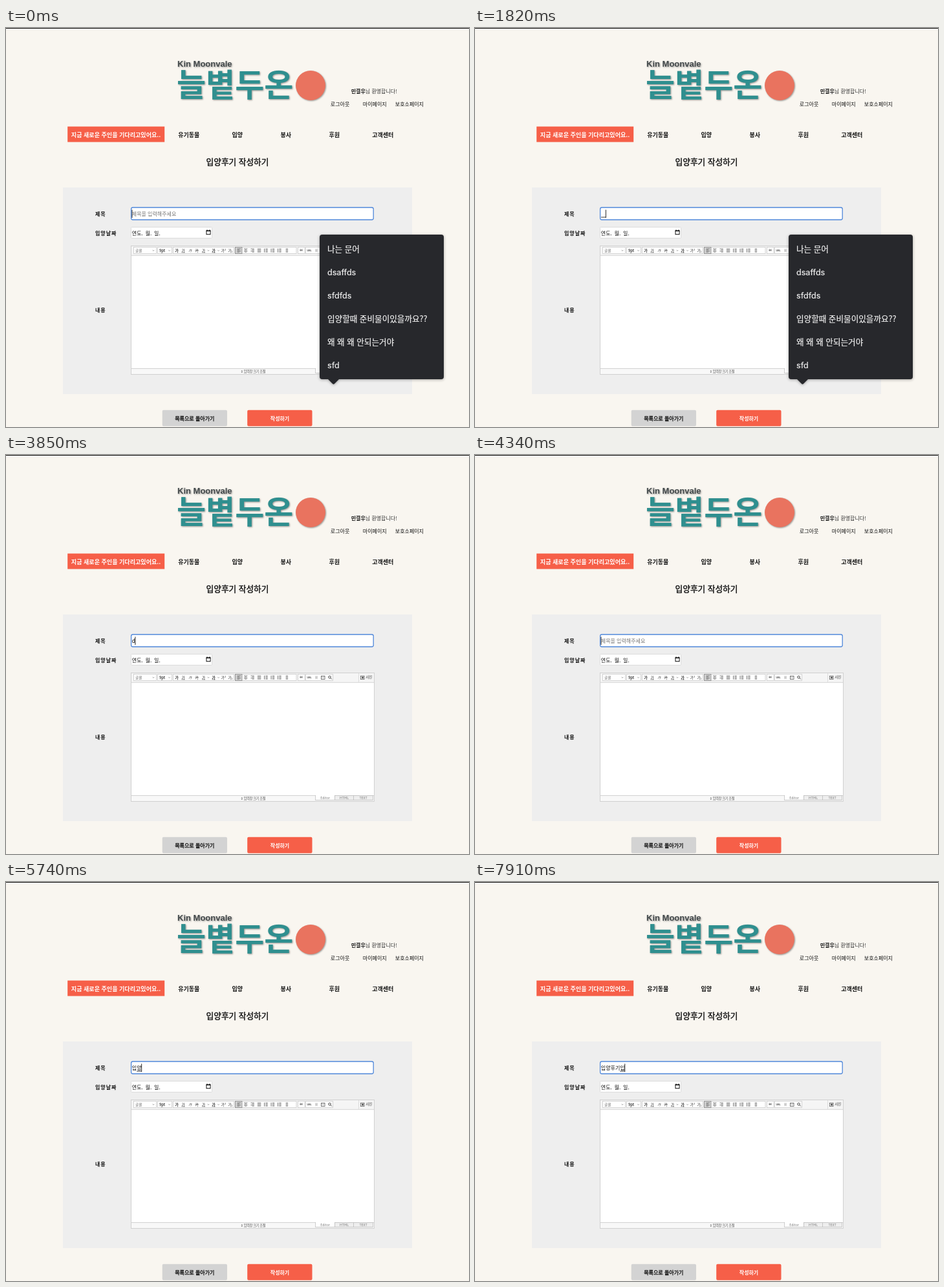
An HTML page that plays this animation: 716x618 px, repeating every 8 s.

```html
<!DOCTYPE html>
<html lang="ko">
<head>
<meta charset="utf-8">
<style>
html, body { margin: 0; width: 100%; height: 100%; overflow: hidden; background: #f9f6f0; }
svg { display: block; width: 716px; height: 618px; }
text { font-family: "Noto Sans CJK KR", "Noto Sans CJK", "Noto Sans", sans-serif; white-space: pre; }
</style>
</head>
<body>
<svg id="stage" viewBox="0 0 716 618" xmlns="http://www.w3.org/2000/svg"></svg>
<script>
const stage = document.getElementById('stage');

function add(tag, attrs, parent = stage) {
  const el = document.createElementNS(stage.namespaceURI, tag);
  for (const key in attrs) el.setAttribute(key, attrs[key]);
  return parent.appendChild(el);
}
const rect = (x, y, width, height, fill, more = {}, parent) =>
  add('rect', { x, y, width, height, fill, ...more }, parent);
const line = (d, stroke = '#555', width = 1, parent) =>
  add('path', { d, stroke, fill: 'none', 'stroke-width': width }, parent);
// cy is the vertical middle of the glyphs
function label(x, cy, string, size, more = {}, parent) {
  const el = add('text', { x, y: cy + size * 0.35, 'font-size': size, fill: '#111', ...more }, parent);
  el.textContent = string;
  return el;
}
const bold = { 'font-weight': 700 };
const middle = { 'text-anchor': 'middle' };
const medium = (color = '#111', width = .3) => ({ fill: color, stroke: color, 'stroke-width': width });

function drawHeader() {
  rect(0, 0, 716, 1, '#151515');
  const brand = add('g', { style: 'filter: drop-shadow(1px 1px 1px #0006)' });
  label(265, 55, 'Kin Moonvale', 13, { ...bold, fill: '#43494b',
    style: 'font-family: "Liberation Sans", sans-serif' }, brand);
  label(264, 89, '늘볕두온', 49, { 'font-weight': 900, fill: '#2f8f8f' }, brand);
  add('circle', { cx: 471, cy: 89, r: 23, fill: '#e9735f' }, brand);

  label(533.7, 98, '민결우', 8, bold);
  label(555.8, 98, '님 환영합니다!', 8, { fill: '#333' });
  label(501.8, 118, '로그아웃', 8);
  label(551.8, 118, '마이페이지', 8);
  label(601.8, 118, '보호소페이지', 8);

  rect(95.2, 152.6, 150, 24, '#f65f48');
  label(170, 165.5, '지금 새로운 주인을 기다리고있어요..', 9.05, { ...bold, ...middle, fill: '#fff' });
  ['유기동물', '입양', '봉사', '후원', '고객센터'].forEach((item, i) =>
    label(282.7 + 75 * i, 165.5, item, 9, { ...bold, ...middle }));
  label(358, 208, '입양후기 작성하기', 12.7, { ...middle, ...medium('#111', .4) });
}

function drawForm() {
  rect(88, 247, 540, 320, '#eee');
  [['제목', 288], ['입양날짜', 318], ['내용', 437]].forEach(([name, y]) =>
    label(138, y, name, 8, { ...bold, 'letter-spacing': 1 }));
  rect(193.6, 278, 374.6, 19, '#fff', { rx: 2.5, stroke: '#5088da', 'stroke-width': 1.3 });
  rect(193.5, 308.5, 125, 17, '#fff', { rx: 1, stroke: '#d6d6d6', 'stroke-width': .8 });
  label(194.8, 318, '연도. 월. 일.', 8, { 'word-spacing': 1.6 });
  rect(310, 314.2, 6, 5.5, 'none', { stroke: '#111' });
  line('M309.5 314.2h7M311 312.5v1.5M315 312.5v1.5', '#111', 1.3);

  rect(241.7, 591.7, 100.3, 25, '#d3d3d3', { rx: 2 });
  label(291.8, 604.8, '목록으로 돌아가기', 8, { ...middle, ...medium() });
  rect(373.2, 591.7, 100.3, 25, '#f65f48', { rx: 2 });
  label(423.5, 604.8, '작성하기', 8, { ...bold, ...middle, fill: '#fff' });
}

function drawEditor() {
  const box = (x, width, fill = '#fff') =>
    rect(x, 339.5, width, 10, fill, { stroke: '#c9c9c9', 'stroke-width': .8 });
  const arrow = x => line(`M${x - 1.3} 344l1.3 1.3 1.3-1.3`, '#777', .7);
  const icon = (x, string, more = {}) =>
    label(x, 344.6, string, 5.6, { ...middle, fill: '#333', ...more });

  rect(193.5, 337.5, 376, 199, '#fff', { stroke: '#c8c8c8', 'stroke-width': .8 });
  rect(194, 338, 375, 14, '#f5f5f5');
  line('M194 352.3h375', '#c8c8c8', .8);
  line('M545.5 338v14', '#ddd');

  box(197.5, 35);
  label(200, 344.6, '글꼴', 5.6, { fill: '#666' });
  arrow(228);
  box(234.5, 22);
  label(237, 344.6, '9pt', 5.6, { ...bold, fill: '#444' });
  arrow(252.5);

  box(258.5, 94);
  icon(264, '가', bold);
  icon(274, '가', { 'text-decoration': 'underline' });
  icon(284.5, '가', { 'font-style': 'italic' });
  icon(295, '가', { 'text-decoration': 'line-through' });
  icon(305.5, '가', { 'text-decoration': 'underline' });
  arrow(313);
  icon(321, '가', { ...bold, 'text-decoration': 'underline' });
  arrow(328.5);
  icon(336.5, '가²');
  icon(347, '가₂');

  box(354.5, 94.5);
  rect(354.5, 339.5, 10.5, 10, '#d2d2d2', { stroke: '#888', 'stroke-width': .8 });
  // alignment, list and indent buttons
  for (let i = 0; i < 8; i++) {
    const x = 357.5 + 10.45 * i;
    const listLike = i > 3;
    for (let row = 0; row < 4; row++) {
      const short = row % 2 === 1 && i !== 3;
      const inset = listLike ? 2 : short ? [0, 1, 2][i] : 0;
      line(`M${x + inset} ${342 + row * 1.7}h${short || listLike ? 3.5 : 5.5}`, '#666', .8);
    }
    if (listLike && i < 7) line(`M${x + .3} 341.6v6`, '#555', .8);
  }

  box(451.5, 10.5);
  icon(456.7, '“', { ...bold, 'font-size': 9, y: 350 });
  box(463.5, 42);
  icon(469, 'URL', { ...bold, 'font-size': 3.4, y: 346 });
  icon(480, '※');
  rect(487.5, 342.3, 5.5, 5, 'none', { stroke: '#555', 'stroke-width': .8 });
  line('M487.5 344h5.5M490.2 344v3', '#999', .6);
  add('circle', { cx: 500.5, cy: 344, r: 1.8, fill: 'none', stroke: '#333', 'stroke-width': .9 });
  line('M501.8 345.3l2 2', '#333');
  rect(548.5, 342.3, 5.5, 5, '#fff', { stroke: '#555', 'stroke-width': .8 });
  rect(550, 343.5, 3, 2.7, '#555');
  label(556.5, 344.6, '사진', 5.3, { fill: '#333' });

  rect(194, 527.5, 375, 8.5, '#f8f8f8');
  line('M194 527.5h375', '#c8c8c8', .8);
  label(362.5, 532, '⇕ 입력창 크기 조절', 5.3, { fill: '#555', 'letter-spacing': -.4 });
  [['Editor', 478.5, 30], ['HTML', 508.5, 29], ['TEXT', 537.5, 30]].forEach(([name, x, width], i) => {
    rect(x, 527.5, width, 7, i ? '#eee' : '#fff', { stroke: '#c0c0c0', 'stroke-width': .8 });
    label(x + width / 2, 531, name, 5.2, { ...middle, fill: '#777' });
  });
  line('M479 527.5h29', '#fff', 1.2);
}

function drawSuggestions() {
  const popup = add('g', { style: 'filter: drop-shadow(0 1px 2px #0005)' });
  rect(485, 320, 192, 224, '#27282c', { rx: 4 }, popup);
  add('path', { d: 'M497.5 543.5l7.5 7.5q1.5 1.5 3 0l7.5-7.5z', fill: '#27282c' }, popup);
  ['나는 문어', 'dsaffds', 'sfdfds', '입양할때 준비물이있을까요??', '왜 왜 왜 안되는거야', 'sfd'].forEach((entry, i) =>
    label(497, 342.3 + 36 * i, entry, 12.6, {
      ...medium('#f0f0f0', .2), style: /^[a-z]/.test(entry) ? 'font-family: Inter, sans-serif' : ''
    }, popup));
  return popup;
}

drawHeader();
drawForm();
drawEditor();
const popup = drawSuggestions();
const hint = label(194.8, 288, '제목을 입력해주세요', 8, { fill: '#757575' });
const typed = label(194.8, 288, '', 8);
const underline = rect(195, 292.6, 0, .9, '#222');
const caret = rect(194.5, 281.5, .9, 12.5, '#111');

// [start ms, text, caret shown, last letter composing, glyphs hidden while the font loads]
const steps = [
  [0, '', 1], [350, '', 0], [910, '', 1], [1400, '', 0],
  [1820, 'ㅇ', 1, 1, 1], [1890, 'ㅇ', 1, 1], [2380, 'ㅇ', 0, 1],
  [2520, '', 1], [3080, '', 0],
  [3150, 'd', 1], [3220, 'dl', 1], [3360, 'dlq', 1], [3710, 'dl', 1], [3850, 'd', 1], [3920, '', 1],
  [4410, 'ㅇ', 1, 1], [4620, '이', 1, 1], [4690, '입', 1, 1],
  [4970, '입야', 1, 1, 1], [5250, '입야', 1, 1], [5320, '입양', 1, 1], [5880, '입양', 0, 1], [6300, '입양', 1, 1],
  [6440, '입양ㅎ', 1, 1], [6580, '입양후', 1, 1, 1], [6720, '입양후', 1, 1], [6790, '입양후ㄱ', 1, 1],
  [6860, '입양후기', 1, 1], [7420, '입양후기', 0, 1],
  [7630, '입양후기ㅇ', 1, 1], [7700, '입양후기이', 1, 1], [7910, '입양후기입', 1, 1]
];

const show = (el, on) => el.setAttribute('visibility', on ? 'visible' : 'hidden');
const start = performance.now();

function render(now) {
  const time = Math.max(0, now - start) % 8000;
  const [, text, caretOn, composing, blank] = steps.findLast(step => step[0] <= time);
  typed.textContent = text;
  const width = text ? typed.getComputedTextLength() : 0;
  show(typed, !blank);
  show(hint, !text);
  show(caret, caretOn);
  show(popup, time < 1890);
  caret.setAttribute('x', 194.5 + width);
  underline.setAttribute('x', 194.8 + width - 7.36);
  underline.setAttribute('width', composing ? 7.36 : 0);
  requestAnimationFrame(render);
}
render(start);
</script>
</body>
</html>
```
